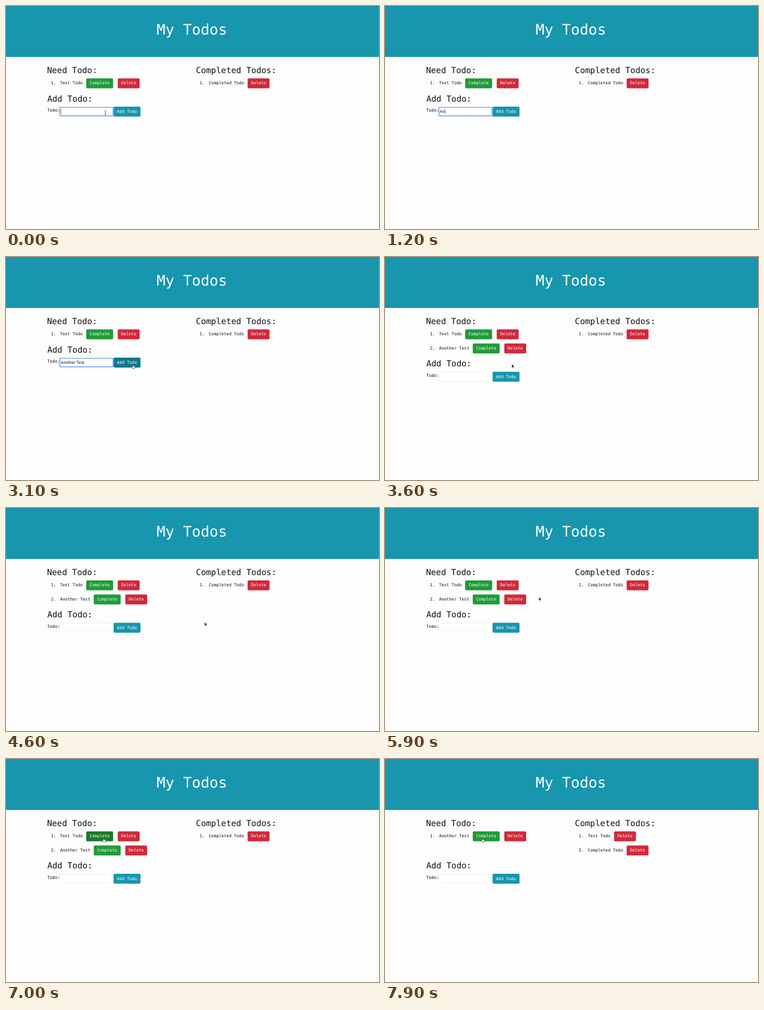
An HTML page that plays this animation: 600x359 px, repeating every 8000 ms.

```html
<!DOCTYPE html>
<html lang="en">
<head>
<meta charset="utf-8">
<title>My Todos</title>
<style>
  html, body { margin: 0; width: 100%; height: 100%; overflow: hidden; background: #fdfdfd; }
  svg { display: block; width: 100vw; height: 100vh; }
  text {
    font: 6.72px "DejaVu Sans Mono", monospace;
    fill: #111; white-space: pre; text-rendering: geometricPrecision;
  }
  .title { font-size: 23.52px; fill: #fff; text-anchor: middle; }
  .head { font-size: 13.44px; }
  .label { fill: #fff; }
  .typed { font-family: "Liberation Sans", Arial, sans-serif; }
  .complete { fill: #209b39; }
  .complete.hover { fill: #1a7a2b; }
  .delete { fill: #d0293a; }
  .delete.hover { fill: #b52230; }
  .add { fill: #1796ae; }
  .add.hover { fill: #13788c; }
  .field { fill: #fff; stroke: #e2e2e2; stroke-width: .5; }
  .field.focus { stroke: #6fa3f0; stroke-width: 1.4; }
  .caret { stroke: #222; stroke-width: .5; }
</style>
</head>
<body>
<svg viewBox="0 0 600 359" preserveAspectRatio="none">
  <rect width="600" height="82" fill="#1796ae"/>
  <text class="title" x="299" y="46">My Todos</text>
  <text class="head" x="65.9" y="108.3">Need Todo:</text>
  <text class="head" x="305.6" y="108.3">Completed Todos:</text>
  <g id="lists"></g>
  <g id="form">
    <text class="head" x="66.4" y="153.8">Add Todo:</text>
    <text x="66.5" y="170.4">Todo:</text>
    <rect id="field" class="field" x="86.6" y="163.1" width="85.5" height="13.6" rx=".6"/>
    <text id="typed" class="typed" x="88.1" y="172.2"></text>
    <path id="caret" class="caret" d="M0 165.6V174"/>
    <g id="addBtn"></g>
  </g>
  <g id="cursor">
    <path id="arrow" d="M0 0V5.9L1.4 4.7L2.3 6.8L3.3 6.4L2.4 4.3H4.2Z" fill="#111" stroke="#fff" stroke-width=".4"/>
    <path id="hand" d="M-.6 .5Q0 -.4 .6 .5V2.7L3.1 3.3Q3.8 3.6 3.6 4.6L3 7H-.4L-2.1 4.5Q-2.2 3.6 -1.4 3.8L-.6 4.6Z" fill="#fff" stroke="#111" stroke-width=".6" stroke-linejoin="round"/>
    <path id="beam" d="M-1.4 -3.4Q0 -3.4 0 -2.6Q0 -3.4 1.4 -3.4M0 -2.6V2.6M-1.4 3.4Q0 3.4 0 2.6Q0 3.4 1.4 3.4M-.7 .9H.7" fill="none" stroke="#222" stroke-width=".6"/>
  </g>
</svg>
<script>
const LOOP = 8000, SUBMIT = 3600, DONE = 7400;
const CHAR = 4.046, ROW = 22.7, BTN_H = 16, COLUMN = 239.4;
const WORDS = "Another Test";
const KEYS = [1100, 1200, 1300, 1400, 1500, 1550, 1600, 1800, 1900, 2000, 2050, 2150];

// time, x, y of the pointer's hot spot
const PATH = [
  [0, 160, 171.7], [2500, 160, 171.7], [2750, 188, 178.6], [2950, 204, 172.4],
  [3900, 204, 172.4], [4400, 319.4, 183.8], [5200, 319.4, 183.8], [5750, 247.7, 143.2],
  [6050, 247.7, 143.2], [6600, 156.8, 126.6], [8000, 156.8, 126.6]
];

const LISTS = [
  [["Test Todo"], ["Completed Todo"]],
  [["Test Todo", "Another Test"], ["Completed Todo"]],
  [["Another Test"], ["Test Todo", "Completed Todo"]]
];

const el = id => document.getElementById(id);
const show = (id, on) => el(id).setAttribute("visibility", on ? "visible" : "hidden");
const btnWidth = label => label.length * CHAR + 10.92;

function button(kind, label, x, y) {
  return `<rect class="${kind}" x="${x}" y="${y}" width="${btnWidth(label)}" height="${BTN_H}" rx="1.7"/>` +
    `<text class="label" x="${x + 5.46}" y="${y + 9.9}">${label}</text>`;
}

function item(name, i, col) {
  const left = col * COLUMN, top = 116.5 + i * ROW, base = top + 9.9;
  let x = left + 86.9 + name.length * CHAR + 5.73;
  let out = `<text x="${left + 72.2}" y="${base}">${i + 1}.</text>` +
    `<text x="${left + 86.9}" y="${base}">${name}</text>`;
  if (!col) {
    out += button("complete", "Complete", x, top);
    x += btnWidth("Complete") + 7.41;
  }
  return out + button("delete", "Delete", x, top);
}

function pointer(t) {
  const k = Math.max(1, PATH.findIndex(p => p[0] > t));
  const [t0, x0, y0] = PATH[k - 1], [t1, x1, y1] = PATH[k];
  const u = (t - t0) / (t1 - t0), e = u * u * (3 - 2 * u);
  return [x0 + (x1 - x0) * e, y0 + (y1 - y0) * e];
}

function inside(rect, x, y) {
  const n = a => +rect.getAttribute(a);
  return x >= n("x") && x <= n("x") + n("width") && y >= n("y") && y <= n("y") + n("height");
}

let stage = -1;
function setStage(s) {
  if (s === stage) return;
  stage = s;
  el("lists").innerHTML = LISTS[s].map((names, col) =>
    names.map((name, i) => item(name, i, col)).join("")).join("");
  el("form").setAttribute("transform", `translate(0 ${s ? ROW : 0})`);
}

function draw(t) {
  setStage(t < SUBMIT ? 0 : t < DONE ? 1 : 2);
  const focus = stage === 0;
  const shift = focus ? 0 : ROW;

  const count = KEYS.filter(k => k <= t).length;
  const typed = el("typed");
  typed.textContent = focus ? WORDS.slice(0, count) : "";
  el("field").setAttribute("class", focus ? "field focus" : "field");

  const since = Math.max(0, t - (count ? KEYS[count - 1] : 100));
  const caretX = 88.5 + (count && focus ? typed.getComputedTextLength() : 0);
  el("caret").setAttribute("transform", `translate(${caretX} 0)`);
  show("caret", focus && Math.floor(since / 500) % 2 === 0);

  const [x, y] = pointer(t);
  let over = false;
  for (const r of document.querySelectorAll("#lists rect, #addBtn rect")) {
    const hit = inside(r, x, r.classList.contains("add") ? y - shift : y);
    over = over || hit;
    r.classList.toggle("hover", hit && stage < 2);
  }
  const inField = inside(el("field"), x, y - shift);
  const hidden = t >= KEYS[0] && t < 2500;
  show("hand", !hidden && over);
  show("beam", !hidden && !over && inField);
  show("arrow", !hidden && !over && !inField);
  el("cursor").setAttribute("transform", `translate(${x} ${y})`);
}

el("addBtn").innerHTML = button("add", "Add Todo", 173.1, 162);
const start = performance.now();
function tick() {
  draw((performance.now() - start) % LOOP);
  requestAnimationFrame(tick);
}
tick();
</script>
</body>
</html>
```
